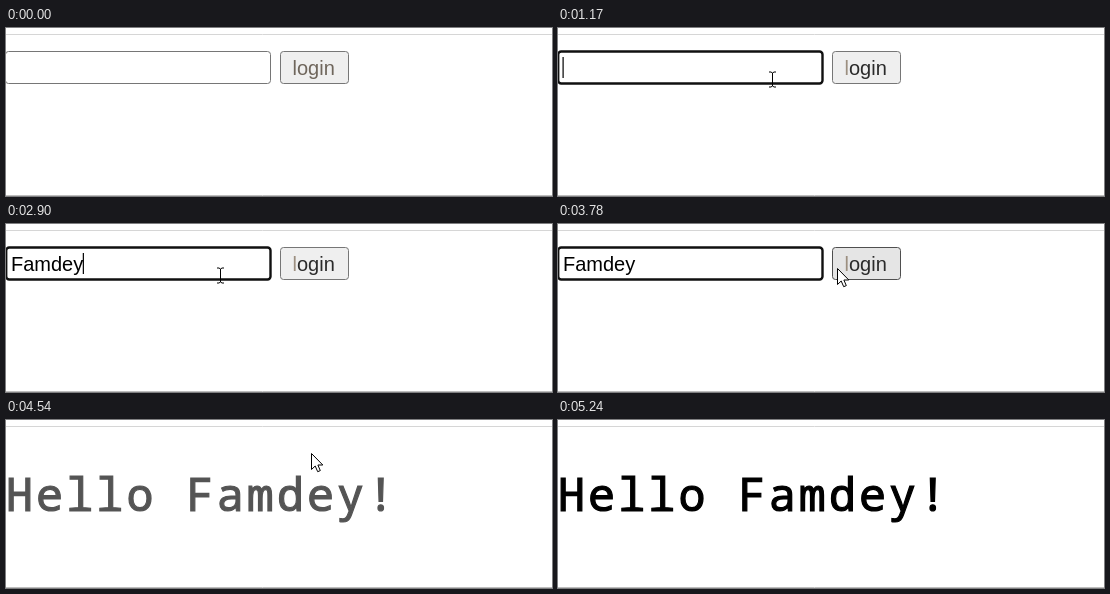
Write an HTML page that moves like this. It is 546 px wide and 168 px high and loops after 6110 ms.

```html
<!DOCTYPE html>
<html lang="en">
<head>
<meta charset="utf-8">
<title>Login greeting</title>
<style>
  html, body { margin: 0; width: 100%; height: 100%; overflow: hidden; background: #fff; }
  svg { display: block; width: 546px; height: 168px; }
  .ui { font: 20px "Liberation Sans", Arial, sans-serif; }
  #hello {
    font: 400 45px "Noto Sans Mono", monospace; letter-spacing: 3.1px; white-space: pre;
    stroke: #000; stroke-width: 1.2px;
  }
</style>
</head>
<body>
<svg viewBox="0 0 546 168">
  <path d="M0 6.5H546" stroke="#d6d6d6"/>
  <path d="M0 167.5H546" stroke="#bdbdbd"/>
  <g id="form" class="ui">
    <rect id="field" fill="#fff"/>
    <text id="value" x="5" y="47"></text>
    <rect id="caret" y="29" width="1.2" height="21"/>
    <rect id="button" x="274.5" y="23.5" width="68" height="32" rx="3"/>
    <text id="label" x="286.5" y="47"><tspan id="initial">l</tspan>ogin</text>
  </g>
  <text id="hello" x="0" y="90.5"></text>
  <path id="arrow" d="M-.5 .5V16.5L3.2 13L5.7 18.7L8.3 17.6L5.9 12H10.8Z" fill="#fff" stroke="#000"/>
  <path id="beam" d="M-3.5-7.5H-1.5L0-6.5L1.5-7.5H3.5M0-6.5V6.5M-3.5 7.5H-1.5L0 6.5L1.5 7.5H3.5" fill="none" stroke="#000"/>
</svg>
<script>
const LOOP = 6110, TICK = 70, NAME = "Famdey";
const FOCUS = 1100, PRESS = 4050, CLEAR = 4120, EXIT = 5240;
const keyTimes = [1500, 1840, 1970, 2500, 2700, 2900];
const moveStarts = [110, 680, 3430, 5030];
const path = [
  [110, 379, 103], [530, 190, 59], [679, 190, 59], [680, 193, 56], [820, 201, 47],
  [1170, 214, 51], [3429, 214, 51], [3430, 224, 50], [3780, 280, 44], [3920, 306, 33],
  [5029, 306, 33], [5030, 330, 45], [5170, 502, 149], [EXIT, 560, 190]
];
const part = id => document.getElementById(id);
const set = (id, attrs) => {
  for (const key in attrs) part(id).setAttribute(key, attrs[key]);
};
const show = (id, on) => set(id, { visibility: on ? "visible" : "hidden" });

// The pointer and the fade advance in fixed ticks.
const snap = (t, start) => start + Math.floor((t - start) / TICK) * TICK;

function pointerAt(t) {
  const start = moveStarts.filter(s => s <= t).pop();
  const time = snap(t, start);
  const i = path.findIndex(p => p[0] > time);
  const a = path[i - 1], b = path[i];
  const k = (time - a[0]) / (b[0] - a[0]);
  return [a[1] + (b[1] - a[1]) * k, a[2] + (b[2] - a[2]) * k];
}

function fade(t) {
  if (t < 4260) return 0;
  if (t >= 4820) return 1;
  return Math.min(.93, .15 + (snap(t, 4260) - 4260) / 540);
}

function draw(t) {
  const present = t >= 110 && t < EXIT;
  const [x, y] = present ? pointerAt(t) : [-50, -50];
  const formOn = t < CLEAR;
  const inRow = formOn && y >= 23 && y < 56;
  const overField = inRow && x >= 0 && x < 265;
  const overButton = inRow && x >= 274 && x < 343;
  const focused = t >= FOCUS;
  const pressed = t >= PRESS;

  part("form").style.display = formOn ? "" : "none";
  set("field", focused
    ? { x: .2, y: 23.5, width: 264.3, height: 32, rx: 3, stroke: "#101010", "stroke-width": 2.4 }
    : { x: -.5, y: 23.5, width: 265, height: 32, rx: 3, stroke: overField ? "#444" : "#767676", "stroke-width": 1 });
  set("button", {
    fill: pressed ? "#f5f5f5" : overButton ? "#e5e5e5" : "#efefef",
    stroke: pressed ? "#8d8d8d" : overButton ? "#4f4f4f" : "#767676"
  });
  set("label", { fill: focused ? "#2b2b2b" : "#6f665c" });
  set("initial", { fill: focused ? "#9c8f80" : "#6f665c" });

  part("value").textContent = NAME.slice(0, keyTimes.filter(k => k <= t).length);
  if (formOn) set("caret", { x: 4.5 + part("value").getComputedTextLength() });
  show("caret", formOn && focused && t < 3500);

  part("hello").textContent = `Hello ${NAME}!`;
  set("hello", { opacity: fade(t) });

  show("arrow", present && !overField);
  show("beam", present && overField);
  set("arrow", { transform: `translate(${Math.round(x)} ${Math.round(y)})` });
  set("beam", { transform: `translate(${Math.round(x) + .5} ${Math.round(y) + .5})` });
}

const began = performance.now();
function frame() {
  draw((performance.now() - began) % LOOP);
  requestAnimationFrame(frame);
}
frame();
</script>
</body>
</html>
```
